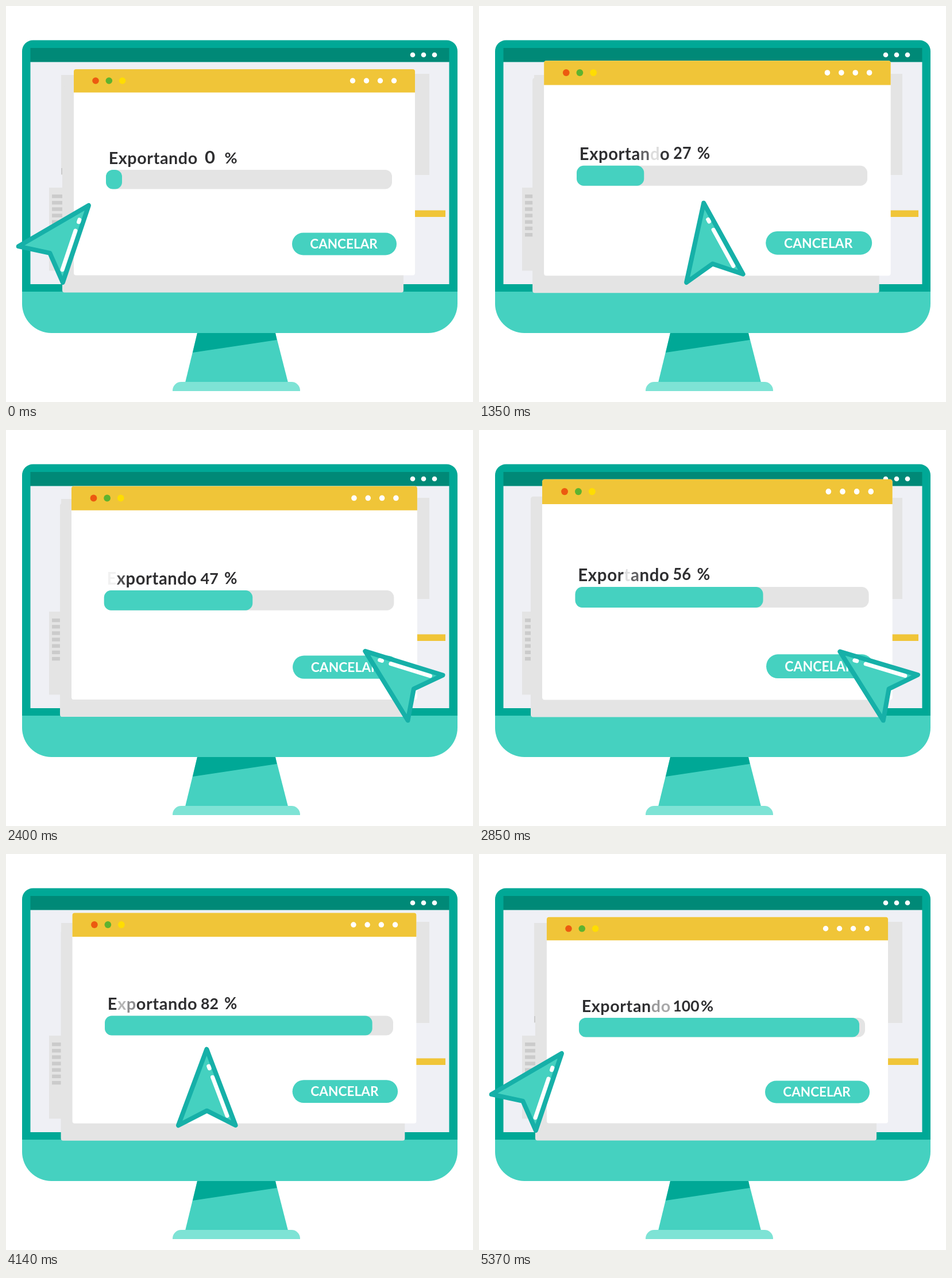
Animation of 813x689 px, one loop 5400 ms. Source, as an HTML page with a canvas:

```html
<!DOCTYPE html>
<html lang="es">
<head>
<meta charset="utf-8">
<title>Exportando</title>
<style>
html, body { margin: 0; width: 100%; height: 100%; overflow: hidden; background: #fff; }
canvas { display: block; }
</style>
</head>
<body>
<canvas id="stage" width="813" height="689"></canvas>
<script>
const ctx = document.getElementById('stage').getContext('2d');
const LOOP = 5400, STEP = 30;
const TEAL = '#45d1c0', DEEP = '#00a896', EDGE = '#16b0a8', GREY = '#e4e4e4', MARK = '#cbcbcb';
const YELLOW = '#f0c538', INK = '#2f2f31', WHITE = '#fff';

const clamp = v => Math.min(1, Math.max(0, v));
const ease = (from, to, t) => {
  const u = clamp((t - from) / (to - from));
  return u * u * (3 - 2 * u);
};

function rect(color, x, y, w, h, radius = 0) {
  ctx.fillStyle = color;
  ctx.beginPath();
  ctx.roundRect(x, y, w, h, radius);
  ctx.fill();
}

// Evenly spaced dots, one per colour.
function dots(colors, x, y, gap, r) {
  colors.forEach((color, i) => {
    ctx.fillStyle = color;
    ctx.beginPath();
    ctx.arc(x + i * gap, y, r, 0, Math.PI * 2);
    ctx.fill();
  });
}

function poly(color, ...points) {
  ctx.fillStyle = color;
  ctx.beginPath();
  points.forEach(([x, y]) => ctx.lineTo(x, y));
  ctx.closePath();
  ctx.fill();
}

function line(x1, y1, x2, y2) {
  ctx.beginPath();
  ctx.moveTo(x1, y1);
  ctx.lineTo(x2, y2);
  ctx.stroke();
}

function setFont(size, spacing = 0) {
  ctx.font = `bold ${size}px Lato, sans-serif`;
  ctx.letterSpacing = `${spacing}px`;
}

function text(str, x, y, size, color) {
  setFont(size);
  ctx.textAlign = 'center';
  ctx.fillStyle = color;
  ctx.fillText(str, x, y);
}

function drawMonitor() {
  poly(TEAL, [333, 569], [469, 569], [491, 655], [312, 655]);
  poly(DEEP, [333, 569], [469, 569], [471.5, 581], [325, 603]);
  rect('#7ee3d5', 290, 654, 222, 16, [15, 15, 0, 0]);

  rect(DEEP, 28, 59.5, 758, 438, [19, 19, 0, 0]);
  rect(TEAL, 28, 497, 758, 72, [0, 0, 51, 51]);
  rect('#008977', 42.5, 73, 729, 24.5);
  rect('#eff0f5', 42.5, 97.5, 729, 386.5);
  dots([WHITE, WHITE, WHITE], 708, 85, 19, 4.3);

  rect(GREY, 96, 120, 304, 174);
  rect(GREY, 400, 118, 337, 176);
  rect(MARK, 96, 282, 14, 11);
  rect(GREY, 75, 316, 55, 144.5);
  for (let i = 0; i < 7; i++) rect(MARK, 80, 328 + i * 11.15, 30, 6.3);
  rect(YELLOW, 640, 355.5, 125, 11.5);
}

function drawLabel(t) {
  // A faint spot sweeps back and forth over the letters.
  const phase = (t / 2220) % 1;
  const spot = -2.02 + 25.2 * Math.min(phase, 1 - phase);
  const word = 'Exportando';
  setFont(28.7, 0.6);
  ctx.textAlign = 'left';
  ctx.fillStyle = INK;
  let x = 178.7;
  [...word].forEach((ch, i) => {
    ctx.globalAlpha = clamp(0.05 + 0.8 * Math.abs(i - spot));
    ctx.fillText(ch, x, 275.3);
    x += ctx.measureText(ch).width;
  });
  ctx.globalAlpha = 1;

  const count = Math.min(100, Math.floor(0.3 + t * 0.0198));
  const shift = count === 100 ? 5.5 : 0;
  text(count, 355 + shift, 274, count < 10 ? 31 : 26.5, INK);
  text('%', 391.5 + shift, 274, 27, INK);
}

function drawWindow(t) {
  const swell = (1 - Math.cos(t / 1080 * Math.PI * 2)) / 2;
  const sx = 1 + 0.0322 * swell, sy = 1 + 0.0863 * swell;
  const place = (dx, dy) => ctx.setTransform(sx, 0, 0, sy, 420 * (1 - sx) + dx, 453 * (1 - sy) + dy);

  place(-20, 30);
  rect(GREY, 118, 110, 594, 358.5, 4);
  place(0, 0);
  rect(WHITE, 118, 110, 594, 358.5, 4);
  rect(YELLOW, 118, 110, 594, 40.5, [4, 4, 0, 0]);
  dots(['#ec5a10', '#5eb32f', '#ffdd00'], 156, 130, 23.3, 5.8);
  dots([WHITE, WHITE, WHITE, WHITE], 603.5, 130, 24, 4.7);

  drawLabel(t);
  rect(GREY, 174, 285, 498, 33.5, 12);
  rect(TEAL, 174, 285, 28 + 460 * ease(0, 4840, t), 33.5, 12);
  rect(TEAL, 498, 394.5, 182, 39, 19.5);
  text('CANCELAR', 588, 422, 22.5, WHITE);
  ctx.setTransform(1, 0, 0, 1, 0, 0);
}

function drawPlane(t) {
  const go = Math.min(ease(20, 2660, t), 1 - ease(2610, 5370, t));
  ctx.save();
  ctx.translate(93.4 + 611.8 * go, 409 + 25.5 * go);
  ctx.rotate((129.2 - 94 * go) * Math.PI / 180);
  ctx.lineJoin = ctx.lineCap = 'round';

  poly(TEAL, [-80, 0], [52.4, -49.8], [27, 0], [52.4, 49.8]);
  ctx.strokeStyle = EDGE;
  ctx.lineWidth = 8;
  ctx.stroke();

  ctx.strokeStyle = WHITE;
  ctx.lineWidth = 7;
  line(-50.5, -3.3, -46.7, -4.7);
  line(-31.4, -10, 35.8, -35.2);
  ctx.restore();
}

function draw(t) {
  ctx.clearRect(0, 0, 813, 689);
  drawMonitor();
  drawWindow(t);
  drawPlane(t);
}

const start = performance.now();
function tick() {
  const t = (performance.now() - start) % LOOP;
  draw(Math.floor(t / STEP) * STEP);
  requestAnimationFrame(tick);
}
tick();
</script>
</body>
</html>
```
